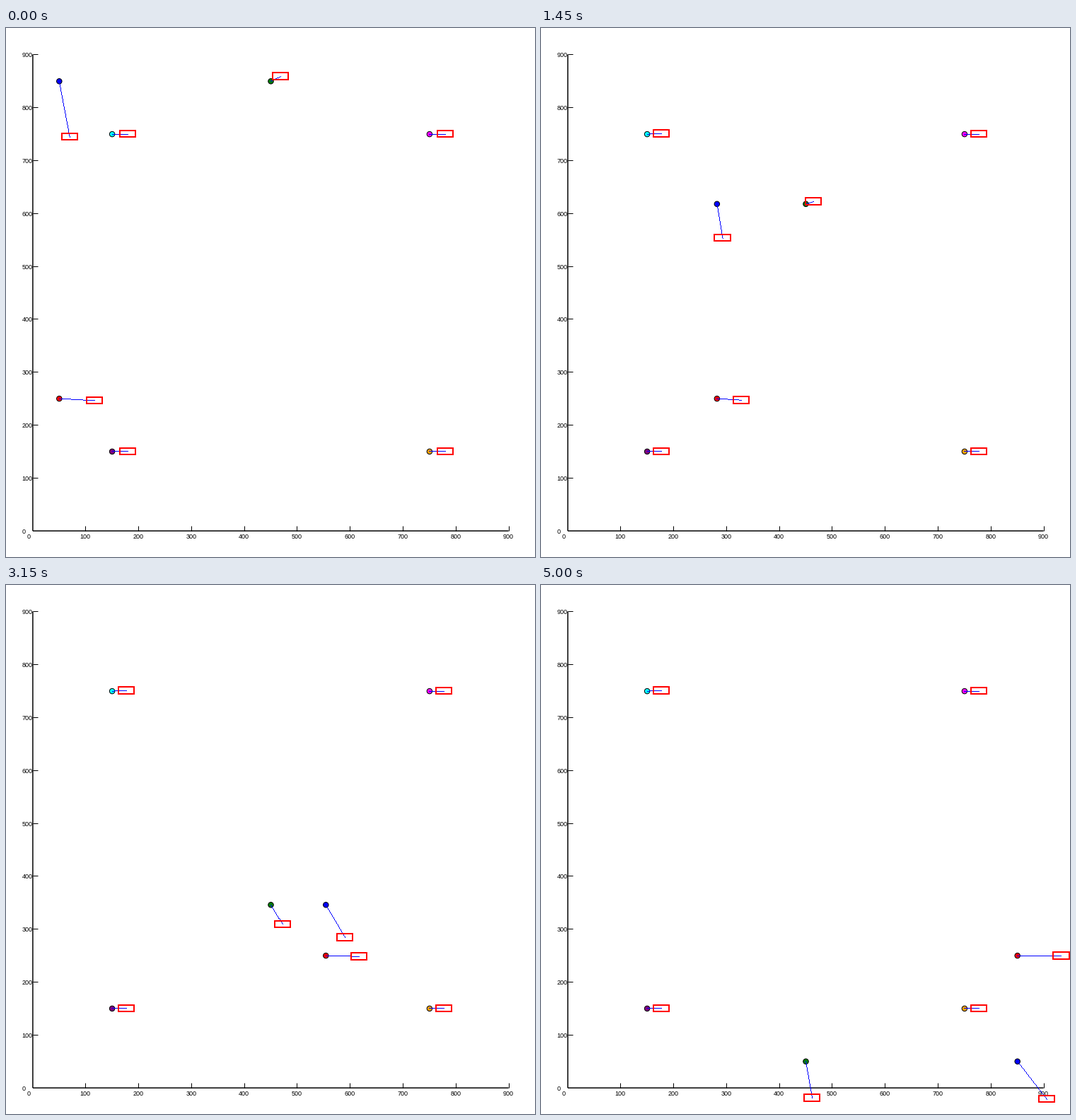
Animation of 748 by 748 pixels, one loop 5050 ms. Source, as a matplotlib script:

```python
import numpy as np
import matplotlib.pyplot as plt
from matplotlib.animation import FuncAnimation
from matplotlib.patches import Circle, Rectangle

SIZE = 748
DPI = 100
FRAMES = 101
SCALE = SIZE / 1000
PX = 72 / DPI
SPEED = 8                 # axis units per frame
HOLD = 4                  # frames before a label starts to follow its point
BOX_W, BOX_H = 30 * SCALE, 13 * SCALE
HALF = 0.5                # pixel centre
TEXT = dict(family="Liberation Sans", size=12 * SCALE * PX, color="black",
            ha="left", va="baseline")


def sx(v):
    return (v + 50) * SCALE


def sy(v):
    return (950 - v) * SCALE


class Point:
    """A point with its label; label offsets are in pixels, y down."""

    def __init__(self, color, pos, heading=(0, 0), start=(22.4, 0), end=(20.4, 0),
                 bulge=(0, 0), swing=(0, 0)):
        self.color = color
        self.pos = np.array(pos)
        self.step = SPEED * np.array(heading)
        self.start, self.end = np.array(start), np.array(end)
        self.bulge, self.swing = np.array(bulge), np.array(swing)
        # a moving point runs on while its label stays; a still one just settles
        lag = HOLD * SCALE * self.step * (1, -1)
        self.rest = self.start - lag if any(heading) else self.end

    def place(self, k):
        x, y = self.pos + self.step * k
        return np.array([sx(x), sy(y)])

    def offset(self, k):
        if k < HOLD:
            return self.start + (self.rest - self.start) * k / HOLD
        s = (k - HOLD) / (FRAMES - 1 - HOLD)
        return (self.rest + (self.end - self.rest) * s
                + self.bulge * np.sin(np.pi * s) + self.swing * np.sin(2 * np.pi * s))


POINTS = [
    Point("#00ffff", (150, 750), end=(20.4, -0.75)),
    Point("#ff00ff", (750, 750)),
    Point("#800080", (150, 150)),
    Point("#ffa500", (750, 150)),
    Point("#ff0000", (50, 250), (1, 0), start=(50, 2.8), end=(62.2, 0.1), bulge=(-1, 0)),
    Point("#008000", (450, 850), (0, -1), start=(13.8, -6.7), end=(9.2, 51.9),
          bulge=(3.5, 8), swing=(-4, 0)),
    Point("#0000ff", (50, 850), (1, -1), start=(15, 78.7), end=(41.9, 53.3),
          bulge=(5.5, -8.5)),
]

fig = plt.figure(figsize=(SIZE / DPI, SIZE / DPI), dpi=DPI, facecolor="white")
ax = fig.add_axes([0, 0, 1, 1])
ax.set_xlim(0, SIZE)
ax.set_ylim(SIZE, 0)
ax.axis("off")


def stroke(xs, ys, width, snap=True):
    ax.plot(xs, ys, color="black", lw=width * PX, solid_capstyle="butt",
            snap=snap, zorder=1)


LEFT, BASE, TICK = sx(0) + HALF, sy(0) + HALF, 10 * SCALE
stroke([LEFT, LEFT], [sy(900), BASE], 2 * SCALE, snap=False)
stroke([LEFT, sx(900)], [BASE, BASE], 2 * SCALE, snap=False)
for v in range(0, 1000, 100):
    if v:
        stroke([sx(v), sx(v)], [BASE, BASE - TICK], 1)
        stroke([LEFT, LEFT + TICK], [sy(v), sy(v)], 1)
    ax.text(sx(v - 10), sy(-15), str(v), **TEXT)
    ax.text(sx(-20), sy(v) + 4, str(v), **TEXT)


def pixel_line(a, b):
    """Centres of the pixels on an unsmoothed line from a to b."""
    n = int(np.ceil(np.abs(b - a).max())) + 1
    return (np.floor(np.linspace(a, b, n) + HALF) + HALF).T


def make_marker(color):
    dot = Circle((0, 0), 5 * SCALE, fc=color, ec="black", lw=PX, zorder=2)
    box = Rectangle((0, 0), BOX_W, BOX_H, fc="none", ec="#ff0000", lw=2 * PX, zorder=4)
    ax.add_patch(dot)
    ax.add_patch(box)
    link, = ax.plot([], [], ",", color="#0000ff", zorder=3)
    return dot, box, link


markers = [make_marker(p.color) for p in POINTS]


def draw(k):
    for p, (dot, box, link) in zip(POINTS, markers):
        spot = p.place(k)
        label = spot + p.offset(k)
        dot.center = spot + HALF
        link.set_data(*pixel_line(spot, label))
        box.set_xy(label - (BOX_W / 2, BOX_H / 2))
    return [part for marker in markers for part in marker]


anim = FuncAnimation(fig, draw, frames=FRAMES, interval=50, repeat=True,
                     repeat_delay=0, blit=False)
plt.show()
```
